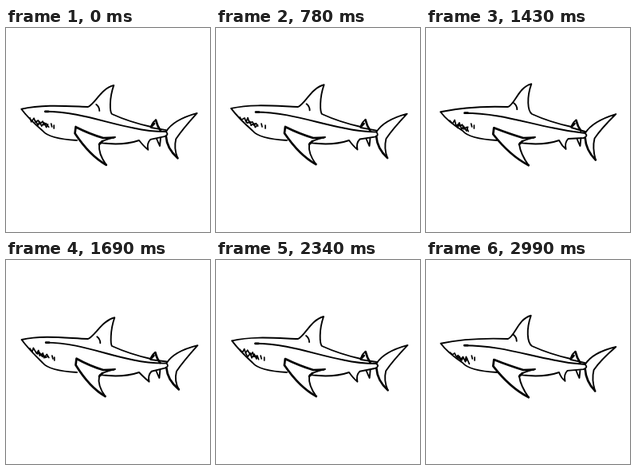
Write an HTML page that moves like this. It is 256 by 256 pixels and loops after 3.12 s.

```html
<!DOCTYPE html>
<html>
<head>
<meta charset="utf-8">
<style>
  html, body { margin: 0; width: 100%; height: 100%; overflow: hidden; background: #fff; }
  svg { display: block; width: 100vw; height: 100vh; }
  path { fill: none; stroke: #000; stroke-linecap: round; stroke-linejoin: round; }
</style>
</head>
<body>
<svg viewBox="0 0 256 256">
  <path id="thin" stroke-width="1.9"/>
  <path id="thick" stroke-width="2.7"/>
  <path id="teeth" stroke-width="1.7"/>
</svg>
<script>
const STEP = 130, COUNT = 24, SWAY = 6;

const noise = n => {
  const s = Math.sin(n * 127.1) * 43758.5453;
  return (s - Math.floor(s)) * 2 - 1;
};

// Jagged rows of teeth along the mouth, redrawn at every step
function scribble(x0, y0, count, rand) {
  let d = `M${x0} ${y0}`;
  for (let i = 1; i < count; i++) {
    const x = i * 2.6 + rand();
    d += `L${x0 + x} ${y0 + x * .42 + (i % 2 ? 3 : -2) + rand() * 1.5}`;
  }
  return d;
}

function draw(step) {
  let seed = step * 100;
  const rand = () => noise(++seed);
  // The head dips and the body leans back once per sway
  const dip = Math.cos((step - 4) / SWAY * 2 * Math.PI);
  const point = (x, y, leanX = 0, leanY = 0) =>
    [x + leanX * dip + rand() * .6, y + leanY * dip + rand() * .6];

  const [nx, ny] = point(19, 103, -1, 3.3);
  const [dx, dy] = point(133.5, 70.7, -3, -1.5);
  const [sx, sy] = point(188, 115.5);
  const [rx, ry] = point(200.5, 131, -1, 1);
  const [tx, ty] = point(239, 108, -2, 1);
  const [fx, fy] = point(212, 139, -2, -1);
  const [bx, by] = point(214, 164, -3, 2);
  const [px, py] = point(86, 124.5, -2, .5);
  const [qx, qy] = point(127, 171.7, 2.5, .5);
  const [ax, ay] = point(176.5, 152.3, -3, -.5);
  const [ex, ey] = point(49, 106, -1, 2);
  const set = (id, d) => document.getElementById(id).setAttribute('d', d);

  set('thin', `
    M${nx} ${ny}C46 ${ny - 6} 75 98 103 99
    C112 95 ${dx - 16} ${dy + 4} ${dx} ${dy}
    C${dx - 6} ${dy + 17} ${dx - 5} ${dy + 34} 133 108
    Q155 118 ${sx - 6} 124Q${sx - 4} ${sy + 2} ${sx} ${sy}
    M${sx - 6} 125L${rx} ${ry - 2}
    M${ex} ${ey}C90 ${ey} 125 119 160 125.5Q180 130 ${rx} ${ry}
    M${rx} ${ry}Q${rx + 9} ${ry - 15} ${tx} ${ty}
    Q${fx + 8} ${fy - 12} ${fx} ${fy}Q${fx - 3} ${fy + 12} ${bx} ${by}
    M${rx} ${ry}q4 4 -2 6
    M${nx} ${ny}Q${nx + 9} ${ny + 12} 46 129Q54 139 89 141
    M${qx} ${qy}Q${qx - 10} ${qy - 14} 117 146Q119 141 137 137
    M118 144Q146 148 167 141Q${ax - 5} ${ay - 4} ${ax} ${ay}
    Q${ax - 2} ${ay - 8} ${ax + 3} ${ay - 13}L${rx - 2} ${ry + 6}
    M${sx + 1} 139Q${sx + 3} 144 ${sx + 5} 148L${sx + 6} 138
    M${dx - 22} ${dy + 24}q4 3 4 8`);

  set('thick', `
    M${ex} ${ey}h4
    M${sx} ${sy}Q${sx + 2} ${sy + 8} ${sx + 6} 129M${sx - 6} 124l4 -4
    M${rx} ${ry + 6}Q${rx + 1} ${by - 12} ${bx} ${by}
    M${px} ${py}Q105 133 122 138L135 137.5
    M${px} ${py}L${px - 1} ${py + 8}Q105 160 ${qx} ${qy}
    M117 146l4 -4`);

  set('teeth', scribble(30, ny + 11, 10, rand) + scribble(37, ny + 15, 7, rand) +
    `M${57 + rand()} 120l1 4M${61 + rand()} 122v4`);
}

function tick() {
  draw(Math.floor(performance.now() / STEP) % COUNT);
  requestAnimationFrame(tick);
}
tick();
</script>
</body>
</html>
```
